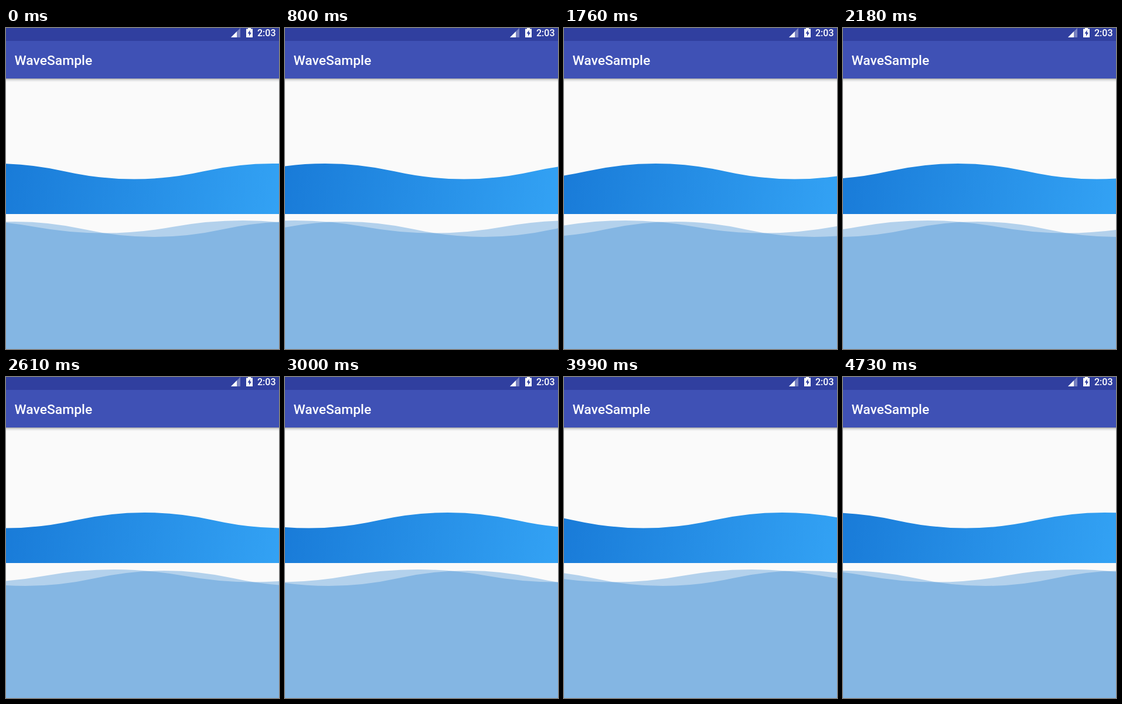
These frames come from a looping animation (466x547 px, 4.83 s). An HTML page:

```html
<!DOCTYPE html>
<html lang="en">
<head>
<meta charset="utf-8">
<title>WaveSample</title>
<style>
  html, body { margin: 0; width: 100%; height: 100%; overflow: hidden; background: #fafafa; }
  svg { display: block; }
  text { font-family: Roboto, sans-serif; font-weight: 500; fill: #fff; }
</style>
</head>
<body>
<svg width="466" height="547" viewBox="0 0 466 547">
  <defs>
    <linearGradient id="sea" gradientUnits="userSpaceOnUse" x1="0" y1="231" x2="466" y2="317">
      <stop offset="0" stop-color="#197bd8"/>
      <stop offset="1" stop-color="#33a2f4"/>
    </linearGradient>
    <linearGradient id="shade" x2="0" y2="1">
      <stop offset="0" stop-opacity=".34"/>
      <stop offset=".4" stop-opacity=".12"/>
      <stop offset="1" stop-opacity="0"/>
    </linearGradient>
  </defs>

  <rect width="466" height="22" fill="#303f9f"/>
  <rect y="22" width="466" height="64" fill="#3f51b5"/>
  <rect y="86" width="466" height="6" fill="url(#shade)"/>
  <text x="14.5" y="63" font-size="22.9">WaveSample</text>

  <path d="M384 16L400 0V16z" fill="#fff" opacity=".35"/>
  <path d="M384 16L394 6V16z" fill="#fff"/>
  <path d="M410 1.5h3V0h5v1.5h3V16h-11z" fill="#fff"/>
  <path d="M416.5 3.5L412.5 9.5H415V14L419 7.8H416.5z" fill="#303f9f"/>
  <text x="429" y="14" font-size="16">2:03</text>

  <path id="top" fill="url(#sea)"/>
  <g fill="#2981d1" fill-opacity=".34">
    <path id="back"/>
    <path id="front"/>
  </g>
</svg>
<script>
const LOOP = 4830, HALF = 237, PERIOD = 2 * HALF;

// The picture advances in discrete steps at these times (ms).
const steps = [0, 120, 270, 410, 530, 650, 800, 920, 1050, 1200, 1330, 1480,
  1630, 1760, 1910, 2060, 2180, 2330, 2480, 2610, 2730, 2880, 3000, 3150, 3300,
  3450, 3570, 3720, 3870, 3990, 4140, 4300, 4450, 4600, 4730];

// Travel to the right: [time, pixels], linear in between.
const travel = [[0, 0], [800, 87], [1760, 175], [2610, 255], [3450, 344],
  [3990, 391], [4730, 465], [LOOP, PERIOD]];

const waves = [
  { id: "top", crest: 455.5, mid: 244.25, amp: 13.25, bottom: 317 },
  { id: "back", crest: 404, mid: 338.8, amp: 10.8, bottom: 547 },
  { id: "front", crest: 15, mid: 343, amp: 13, bottom: 547 }
];

function shiftAt(t) {
  const i = travel.findIndex(p => p[0] > t);
  const [t0, x0] = travel[i - 1], [t1, x1] = travel[i];
  return x0 + (x1 - x0) * (t - t0) / (t1 - t0);
}

function wavePath({ crest, mid, amp, bottom }, shift) {
  const x = (crest - HALF / 2 + shift) % PERIOD;
  const start = (x < 0 ? x + PERIOD : x) - PERIOD;
  const arc = `t${HALF} 0`;
  return `M${start} ${mid}q${HALF / 2} ${-2 * amp} ${HALF} 0${arc.repeat(3)}V${bottom}H${start}z`;
}

function draw() {
  const now = performance.now() % LOOP;
  const shift = shiftAt(steps.findLast(t => t <= now));
  for (const w of waves) document.getElementById(w.id).setAttribute("d", wavePath(w, shift));
  requestAnimationFrame(draw);
}
draw();
</script>
</body>
</html>
```
